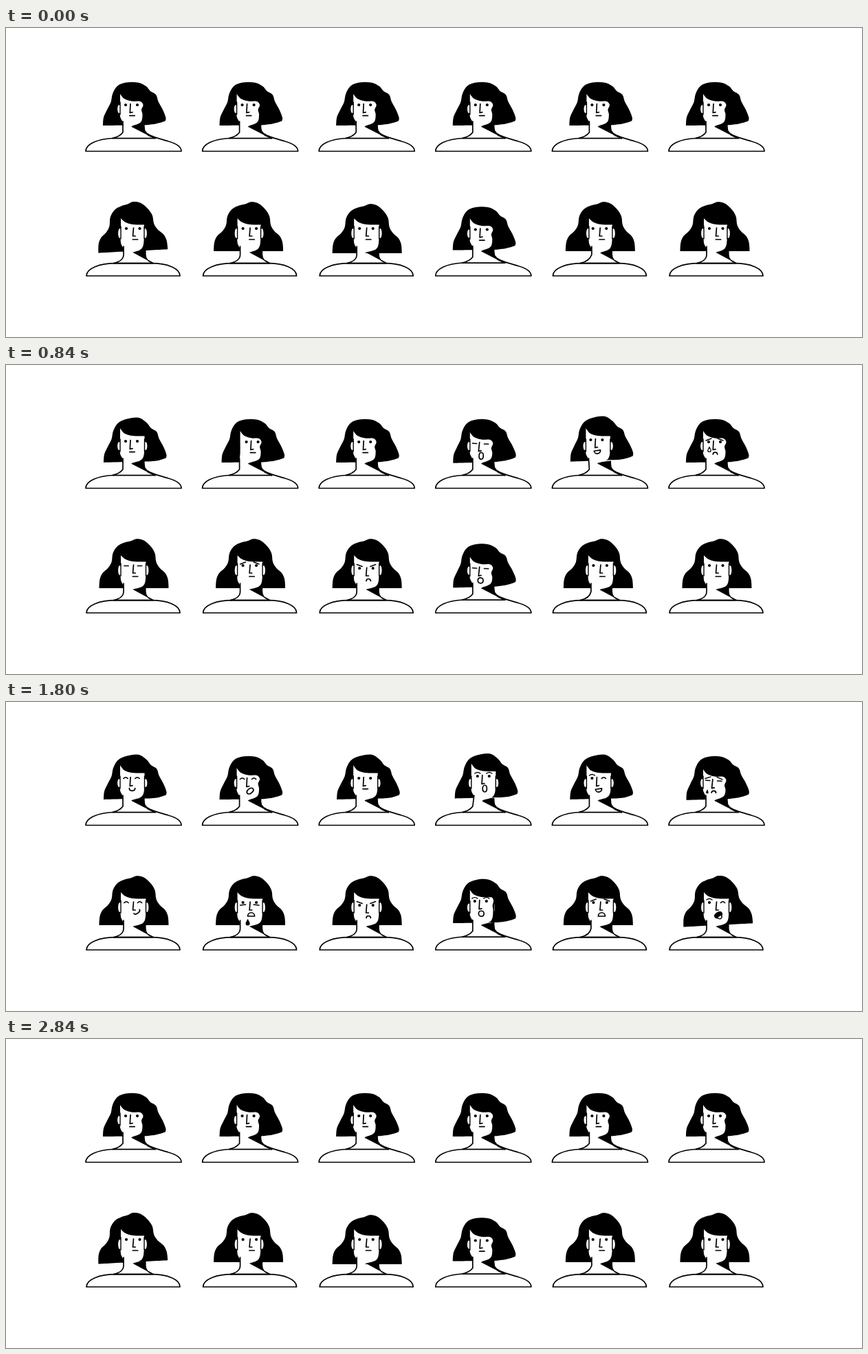
An HTML page with a canvas for the animation above (2.88 s loop, 1245 by 450 pixels).

```html
<!DOCTYPE html>
<html lang="en">
<head>
<meta charset="utf-8">
<title>Moods</title>
<style>
html, body { margin: 0; width: 100%; height: 100%; overflow: hidden; background: #fff; }
canvas { display: block; width: 1245px; height: 450px; }
</style>
</head>
<body>
<canvas id="stage"></canvas>
<script>
const W = 1245, H = 450, LOOP = 2880, COLUMN = 169.6, ROW = 181.5;
const TIMES = [0, 520, 840, 1200, 1800, 2360, 2840];
const canvas = document.getElementById('stage');
const ctx = canvas.getContext('2d');
const dpr = window.devicePixelRatio || 1;
canvas.width = W * dpr;
canvas.height = H * dpr;

const lerp = (a, b, k) => a + (b - a) * k;
const smooth = k => k * k * (3 - 2 * k);

// Closed spline through [x, y, softness]; softness 0 makes a corner.
function spline(pts) {
  const path = new Path2D();
  const n = pts.length;
  const node = i => pts[(i + n) % n];
  const handle = (i, len) => {
    const [ax, ay] = node(i - 1), [bx, by] = node(i + 1), soft = node(i)[2] ?? 1;
    const k = soft * len / 3 / Math.hypot(bx - ax, by - ay);
    return [(bx - ax) * k, (by - ay) * k];
  };
  path.moveTo(pts[0][0], pts[0][1]);
  for (let i = 0; i < n; i++) {
    const [ax, ay] = node(i), [bx, by] = node(i + 1);
    const len = Math.hypot(bx - ax, by - ay);
    const [ux, uy] = handle(i, len), [vx, vy] = handle(i + 1, len);
    path.bezierCurveTo(ax + ux, ay + uy, bx - vx, by - vy, bx, by);
  }
  path.closePath();
  return path;
}

// Raises the crown of the hair around x = cx.
const crown = (pts, cx, width, height) => pts.map(([x, y, soft]) =>
  [x, y - height * Math.exp(-(((x - cx) / width) ** 2)), soft]);

const sideHair = [[141, 142, 0], [142, 130], [147, 119], [152.5, 108], [155, 96], [162, 84.5],
  [174, 79.5], [192, 79.5], [204, 85], [210, 92], [218, 97], [221.5, 107], [228, 119],
  [232.5, 131], [231.5, 135.5, .3], [218, 139.5], [201, 141.5, 0]];
const halfHair = [[136, 325, 0], [137, 312], [141, 303], [149, 295.5], [154, 287], [156, 274],
  [163, 263.5], [173, 258.5], [183, 257.5]];
const frontHair = [...halfHair, ...halfHair.map(([x, y, s]) => [373 - x, y, s]).reverse()];

const facePath = ({ l, r, top, brow, chin, dent, neck }) => spline([
  [l, top, 0], [l + 6, brow - 4], [l + 17, brow - .5],
  [r - dent * 1.6, brow, dent / 2.5], [r, brow + 5], [r - dent, brow + 12], [r - dent * .4, brow + 19],
  [r - 3.5, chin - 6], [neck + 13, chin, .6], [neck + 10, chin + 5, 0], [neck, chin + 5, 0],
  [neck, chin - 5], [l, chin - 14], [l, brow + 5]]);

const SIDE = {
  mid: [185, 112], eyes: [174, 191, 112], mouth: [183.5, 127.6],
  nose: 'M181 110.5L180.3 123.5L184 122.7', ear: [118, 6], neck: 170,
  shoulders: 'M203 151C204 157 224 161 236 165C247 168 255 173 255 179.5H116C116 170 131 161.5 156 160.5',
  collar: 'M156 160.7H217', shadow: 'M181 142.5L201 140C201 148 202 154 208 157L217 161Z',
  nape: x => `M${x} 136L170 152C167 156 162 159 155 160.5`,
  hair: p => crown(sideHair, 188, 12, 3 * p.t),
  sway: p => p.t + 3 * p.s,
  face: p => ({
    l: 166 + 5 * p.s, r: 199.5 + 2 * p.t + 2.5 * p.s, neck: 170, chin: 143,
    top: 96 - 4 * p.t + p.fringe, brow: 107 - 3.5 * p.t + p.fringe,
    dent: 2.5 * (1 - p.t)
  })
};
const FRONT = {
  mid: [186, 290], eyes: [175, 194.5, 292], mouth: [188, 308],
  nose: 'M185.5 291L184.5 303H188.2', ear: [299, 7], neck: 171,
  shoulders: 'M117 361C117 350 136 342.7 160 342.7H211C235 342.7 253 350 253 361Z',
  collar: 'M157 342.7H213', shadow: 'M184 326L203 324V330C203 337 208 341 215 342.7Z',
  nape: x => `M${x} 318V330C171 337 164 341 157 342.5`,
  hair: () => crown(frontHair, 194, 10, 5),
  sway: p => 3 * p.t - 3.5,
  face: p => ({
    l: 167, r: 201 + 2.5 * p.t, neck: 171, chin: 327,
    top: 277, brow: 286.5, dent: 0
  })
};

// x y rot: hair; t s: head turn; fx fringe: face; ex ey tilt: features;
// r* dots, a* lids, b* brows, m* mouth, d* drop, tg tongue.
const REST = { rl: 1, rr: 1, ah: 3.5, by: -5, mw: 3.7 };
for (const name of ('x y rot t s fx fringe ex ey tilt al ar bl br bt bh ' +
  'mx my mu mv mr mk d dx dy dk tg').split(' ')) REST[name] = 0;

const LOOKS = {
  calm: {},
  turned: { t: 1 },
  half: { t: .5 },
  away: { s: 1 },
  askew: { s: .4 },
  bowed: { fringe: 2, ex: -1.2, ey: 2.3, tilt: 3, rot: -1 },
  lifted: { t: .4, y: -1.5, fringe: -2.5, ex: -1, ey: -3 },
  aside: { t: .6, fx: 2, x: 2, ex: 4 },
  perky: { t: 1, y: -2, rot: -1, fx: -1, ex: -2, ey: -2 },
  cocked: { rot: -3 },
  low: { y: 3 },
  right: { x: 3, fx: 2.5, ex: .3 },
  left: { x: -3, fx: 1.5, ex: 1 },
  shut: { rl: -1, rr: -1, al: 1, ar: 1 },
  flat: { ah: -3.5 },
  wink: { rr: -1, ar: 1, bl: 1, bh: -3, by: 1 },
  raised: { bl: 1, br: 1, bh: -3, by: 1 },
  sad: { bl: 1, br: 1, bt: -3, by: 1.5 },
  angry: { bl: 1, br: 1, bt: 3, by: 1, ey: 4 },
  weary: { bl: 1, br: 1, bt: -1, by: 8.5 },
  smile: { mw: .5, mu: 5, mv: 5, my: -1 },
  smirk: { mw: 1.3, mu: 4, mv: 4, mr: -35, mx: 2, my: -3 },
  laugh: { mw: 1.6, mu: -4.5, mv: 4.5, mr: -38, mx: 2, my: 2 },
  grin: { mw: 1, mv: 6, mr: -8 },
  frown: { mw: -.5, mu: -4, mv: -4, my: 2.5 },
  gasp: { mw: -.6, mu: -6.5, mv: 6.5, mx: 1, my: 2.5 },
  oh: { mw: .2, mu: -5.3, mv: 5.3, my: 2.5 },
  pout: { mu: -2.5, mv: 2, mk: 1, my: 1 },
  dome: { mw: 1.3, mu: -7, mx: -1, my: 4 },
  tongue: { mw: 1.9, mu: -4.5, mv: 5, mr: -32, mk: 1, tg: 1, my: 2 },
  tear: { d: .9, dx: 1, dy: 11 },
  fall: { d: .6, dy: 17, dk: 1 },
  drool: { d: .8, dx: 7, dy: 22 },
  drip: { d: 1, dx: 7, dy: 29, dk: 1 }
};

function pose(names) {
  const p = { ...REST };
  for (const look of names.split(' ')) {
    for (const [key, v] of Object.entries(LOOKS[look])) p[key] += v;
  }
  return p;
}

const cast = [
  [SIDE, 0, 0, 'calm, turned, turned, turned shut smile, turned shut smile, smile'],
  [SIDE, 1, 0, 'calm, away, away, askew shut laugh, shut laugh, shut laugh'],
  [SIDE, 2, 0, 'calm, calm, calm, half, turned, calm'],
  [SIDE, 3, 0, 'calm, bowed, bowed shut flat gasp, lifted raised gasp, lifted aside raised gasp, bowed pout'],
  [SIDE, 4, 0, 'calm, perky, perky grin, half wink grin, turned wink grin, grin'],
  [SIDE, 5, 0, 'calm, sad frown, sad frown tear, bowed half shut flat sad frown tear, bowed shut flat sad frown fall, frown'],
  [FRONT, 0, 0, 'cocked, cocked half, turned shut flat, turned shut smirk, turned shut smirk, calm'],
  [FRONT, 1, 0, 'calm, half, turned sad, turned weary dome drool, turned weary dome drip, calm'],
  [FRONT, 2, 0, 'low turned, low turned, turned angry frown, turned angry frown, turned angry frown, low turned'],
  [SIDE, 3, 1, 'calm, bowed, bowed shut flat oh, lifted raised oh, lifted raised oh, bowed pout'],
  [FRONT, 4, 0, 'right, turned left, turned left, turned left sad dome, turned left sad dome, right'],
  [FRONT, 5, 0, 'calm, half, turned, turned wink tongue, turned cocked wink tongue, calm']
].map(([kind, col, row, keys]) => {
  const poses = keys.split(', ').map(pose);
  return { kind, x: col * COLUMN, y: row * ROW, poses: [...poses, poses[0]] };
});

function fill(path, color) {
  ctx.fillStyle = color;
  ctx.fill(path);
}

function line(d, width = 1.7, alpha = 1) {
  ctx.globalAlpha = alpha;
  ctx.lineWidth = width;
  ctx.stroke(d instanceof Path2D ? d : new Path2D(d));
  ctx.globalAlpha = 1;
}

function oval(x, y, rx, ry, color) {
  if (rx <= .05) return;
  ctx.beginPath();
  ctx.ellipse(x, y, rx, ry, 0, 0, 7);
  ctx.fillStyle = color;
  ctx.fill();
}

function at(x, y, deg, draw) {
  ctx.save();
  ctx.translate(x, y);
  ctx.rotate(deg * Math.PI / 180);
  draw();
  ctx.restore();
}

function drawEye(x, y, side, open, lid, brow, p) {
  at(x, y, 0, () => {
    oval(0, 0, 2.1 * open, 2.1 * open, '#000');
    if (lid > .05) line(`M-3.2 .5Q0 ${.5 - p.ah} 3.2 .5`, 1.5, lid);
    if (brow > .05) {
      const half = p.bt / 2;
      line(`M${-4 * side} ${p.by - half}Q0 ${p.by + p.bh} ${4 * side} ${p.by + half}`, 1.4, brow);
    }
  });
}

function drawMouth({ mw: w, mu: u, mv: v, mk, tg }) {
  const lips = new Path2D(`M${-w} 0C${-w} ${u} ${w} ${u} ${w} 0C${w} ${v} ${-w} ${v} ${-w} 0Z`);
  fill(lips, '#fff');
  ctx.globalAlpha = mk;
  fill(lips, '#000');
  ctx.globalAlpha = 1;
  line(lips);
  if (tg > .3) {
    const tip = new Path2D('M-3 2C-3 8 3.5 8 3.5 2Z');
    fill(tip, '#fff');
    line(tip, 1.4, tg);
  }
}

function drawDrop(x, y, p) {
  if (p.d < .05) return;
  at(x + p.dx, y + p.dy, 0, () => {
    ctx.scale(p.d, p.d);
    const tear = new Path2D('M0 -4C1 -1 2.4 0 2.4 1.6C2.4 4.6 -2.4 4.6 -2.4 1.6C-2.4 0 -1 -1 0 -4Z');
    fill(tear, p.dk > .5 ? '#000' : '#fff');
    line(tear, 1.4);
  });
}

function drawFace(k, p) {
  const face = k.face(p);
  const [y, ry] = k.ear;
  const left = 1 - p.s, right = k === FRONT ? 1 : Math.max(0, p.t * 1.5 - .5);
  oval(face.l - 1.5, y, 2.4 * left, ry, '#fff');
  oval(face.r + 1.5, y, 2.4 * right, ry, '#fff');
  fill(facePath(face), '#fff');
  for (const [x, show] of [[face.l, left], [face.r, right]]) {
    if (show > .3) line(`M${x} ${y - 10}V${y + 8}`, 1.4);
  }
}

function drawPerson({ kind: k, x, y }, p) {
  ctx.save();
  ctx.translate(x, y);
  line(k.shoulders);
  line(k.collar);
  fill(new Path2D(k.shadow), '#000');
  line(k.shadow, 1.2);

  const [cx, cy] = k.mid;
  at(cx + k.sway(p) + p.x, cy + p.y, p.rot, () => {
    ctx.translate(-cx, -cy);
    fill(spline(k.hair(p)), '#000');
  });
  at(p.fx, 0, 0, () => drawFace(k, p));
  line(k.nape(k.neck + p.fx));

  const turnY = k === SIDE ? -p.t : 0;
  at(cx + p.ex + 6 * p.s, cy + p.ey + turnY, p.tilt, () => {
    ctx.translate(-cx, -cy);
    const [l, r, ey] = k.eyes;
    drawEye(l, ey, 1, p.rl, p.al, p.bl, p);
    drawEye(r, ey, -1, p.rr, p.ar, p.br, p);
    line(k.nose);
    at(k.mouth[0] + p.mx, k.mouth[1] + p.my, p.mr, () => drawMouth(p));
    drawDrop(l, ey, p);
  });
  ctx.restore();
}

function poseAt(poses, time) {
  let i = 0;
  while (i < 5 && time >= TIMES[i + 1]) i++;
  const k = smooth(Math.min(1, (time - TIMES[i]) / (TIMES[i + 1] - TIMES[i])));
  const p = {};
  for (const name in REST) p[name] = lerp(poses[i][name], poses[i + 1][name], k);
  return p;
}

const start = performance.now();
function frame(now) {
  const time = Math.max(0, now - start) % LOOP;
  ctx.setTransform(dpr, 0, 0, dpr, 0, 0);
  ctx.fillStyle = '#fff';
  ctx.fillRect(0, 0, W, H);
  ctx.strokeStyle = '#000';
  ctx.lineCap = ctx.lineJoin = 'round';
  for (const person of cast) drawPerson(person, poseAt(person.poses, time));
  requestAnimationFrame(frame);
}
frame(start);
</script>
</body>
</html>
```
